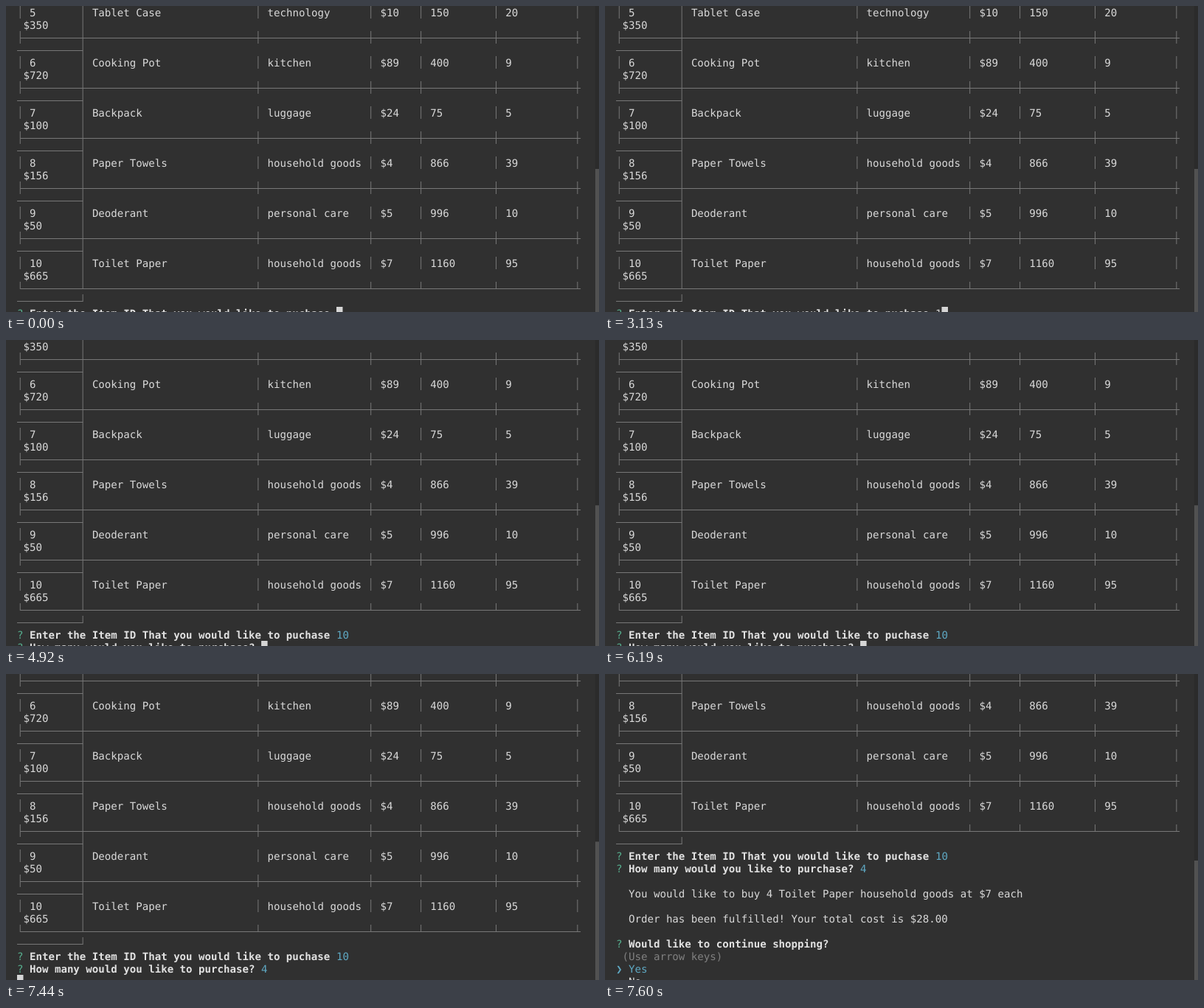
Write an HTML page that moves like this. It is 804 px wide and 415 px high and loops after 8 s.

```html
<!DOCTYPE html>
<html lang="en">
<head>
<meta charset="utf-8">
<title>Terminal store</title>
<style>
  html, body { margin: 0; width: 100%; height: 100%; overflow: hidden; background: #303030; }
  svg { display: block; }
  text {
    font: 14.1px "DejaVu Sans Mono", monospace;
    text-rendering: geometricPrecision;
    white-space: pre;
    fill: #d9d9d9;
  }
  .bold { font-weight: bold; fill: #e2e2e2; }
  .mark { fill: #57b08f; }
  .answer { fill: #5fa9c4; }
  .hint { fill: #808080; }
  .rule { fill: #777; }
</style>
</head>
<body>
<svg id="stage" width="804" height="415" viewBox="0 0 804 415">
  <rect width="804" height="415" fill="#303030"/>
  <g id="page"></g>
  <rect x="799" width="5" height="415" fill="#2b2b2b"/>
  <rect id="thumb" x="799" width="5" height="415" fill="#525252"/>
</svg>
<script>
const LOOP = 8000, LEFT = 15, CELL_W = 8.49, CELL_H = 17;
const BARS = [0, 10, 38, 56, 64, 76, 89];
const FIELDS = [12, 40, 58, 66, 78];
const page = document.getElementById('page');
const thumb = document.getElementById('thumb');

const colX = col => LEFT + col * CELL_W;

function add(parent, tag, attrs) {
  const el = document.createElementNS('http://www.w3.org/2000/svg', tag);
  for (const key in attrs) el.setAttribute(key, attrs[key]);
  return parent.appendChild(el);
}

function write(line, col, content, style = '', parent = page) {
  const el = add(parent, 'text', { x: colX(col), y: line * CELL_H + 14, class: style });
  el.textContent = content;
  return el;
}

function bar(line, col, height = CELL_H) {
  add(page, 'rect', { x: colX(col + 0.5) - 0.5, y: line * CELL_H, width: 1, height, class: 'rule' });
}

function rule(line, from, to) {
  add(page, 'rect', {
    x: colX(from), y: line * CELL_H + 9, width: (to - from) * CELL_W, height: 1, class: 'rule'
  });
}

function question(line, content, parent) {
  write(line, 0, '?', 'mark', parent);
  write(line, 2, content, 'bold', parent);
}

// Each item takes four lines, because the table is wider than the window and wraps.
const items = [
  [5, 'Tablet Case', 'technology', '$10', 150, 20, '$350'],
  [6, 'Cooking Pot', 'kitchen', '$89', 400, 9, '$720'],
  [7, 'Backpack', 'luggage', '$24', 75, 5, '$100'],
  [8, 'Paper Towels', 'household goods', '$4', 866, 39, '$156'],
  [9, 'Deoderant', 'personal care', '$5', 996, 10, '$50'],
  [10, 'Toilet Paper', 'household goods', '$7', 1160, 95, '$665']
];
items.forEach(([id, ...fields], i) => {
  const line = i * 4;
  const jointHeight = i === items.length - 1 ? 10 : CELL_H;
  write(line, 2, id);
  FIELDS.forEach((col, n) => write(line, col, fields[n]));
  write(line + 1, 1, fields[5]);
  for (const col of BARS) {
    bar(line, col);
    bar(line + 2, col, jointHeight);
  }
  bar(line + 1, 10);
  bar(line + 3, 10, jointHeight);
  rule(line + 2, 0.5, 90);
  rule(line + 3, 0, 10.5);
});

question(24, 'Enter the Item ID That you would like to puchase');
question(25, 'How many would you like to purchase?');
const idText = write(24, 51, '');
const countText = write(25, 39, '');
write(27, 2, 'You would like to buy 4 Toilet Paper household goods at $7 each');

const reply = add(page, 'g', {});
write(29, 2, 'Order has been fulfilled! Your total cost is $28.00', '', reply);
question(31, 'Would like to continue shopping?', reply);
write(32, 1, '(Use arrow keys)', 'hint', reply);
write(33, 0, '❯', 'answer', reply);
write(33, 2, 'Yes', 'answer', reply);
write(34, 2, 'No', '', reply);

const cursor = add(page, 'rect', { width: CELL_W, height: CELL_H, fill: '#d6d6d6' });

// The cursor is [line, column]; it is hidden once the menu appears.
const steps = [
  { at: 0,    scroll: 0,  id: '',   count: '',  cursor: [24, 51] },
  { at: 3130, scroll: 0,  id: '1',  count: '',  cursor: [24, 52] },
  { at: 3290, scroll: 0,  id: '10', count: '',  cursor: [24, 53] },
  { at: 4920, scroll: 1,  id: '10', count: '',  cursor: [25, 39] },
  { at: 7130, scroll: 1,  id: '10', count: '4', cursor: [25, 40] },
  { at: 7440, scroll: 2,  id: '10', count: '4', cursor: [26, 0] },
  { at: 7510, scroll: 5,  id: '10', count: '4', cursor: [29, 0] },
  { at: 7600, scroll: 10, id: '10', count: '4', cursor: null }
];

function show(step) {
  page.setAttribute('transform', `translate(0 ${-step.scroll * CELL_H})`);
  thumb.setAttribute('y', 221 + step.scroll * 3.2);
  idText.textContent = step.id;
  idText.setAttribute('class', step.scroll >= 1 ? 'answer' : '');
  countText.textContent = step.count;
  countText.setAttribute('class', step.scroll >= 2 ? 'answer' : '');
  reply.setAttribute('visibility', step.cursor ? 'hidden' : 'visible');
  cursor.setAttribute('visibility', step.cursor ? 'visible' : 'hidden');
  if (step.cursor) {
    cursor.setAttribute('x', colX(step.cursor[1]));
    cursor.setAttribute('y', step.cursor[0] * CELL_H);
  }
}

const start = performance.now();
let current;
function tick() {
  const time = (performance.now() - start) % LOOP;
  const step = steps.findLast(s => s.at <= time);
  if (step !== current) show(current = step);
  requestAnimationFrame(tick);
}
tick();
</script>
</body>
</html>
```
